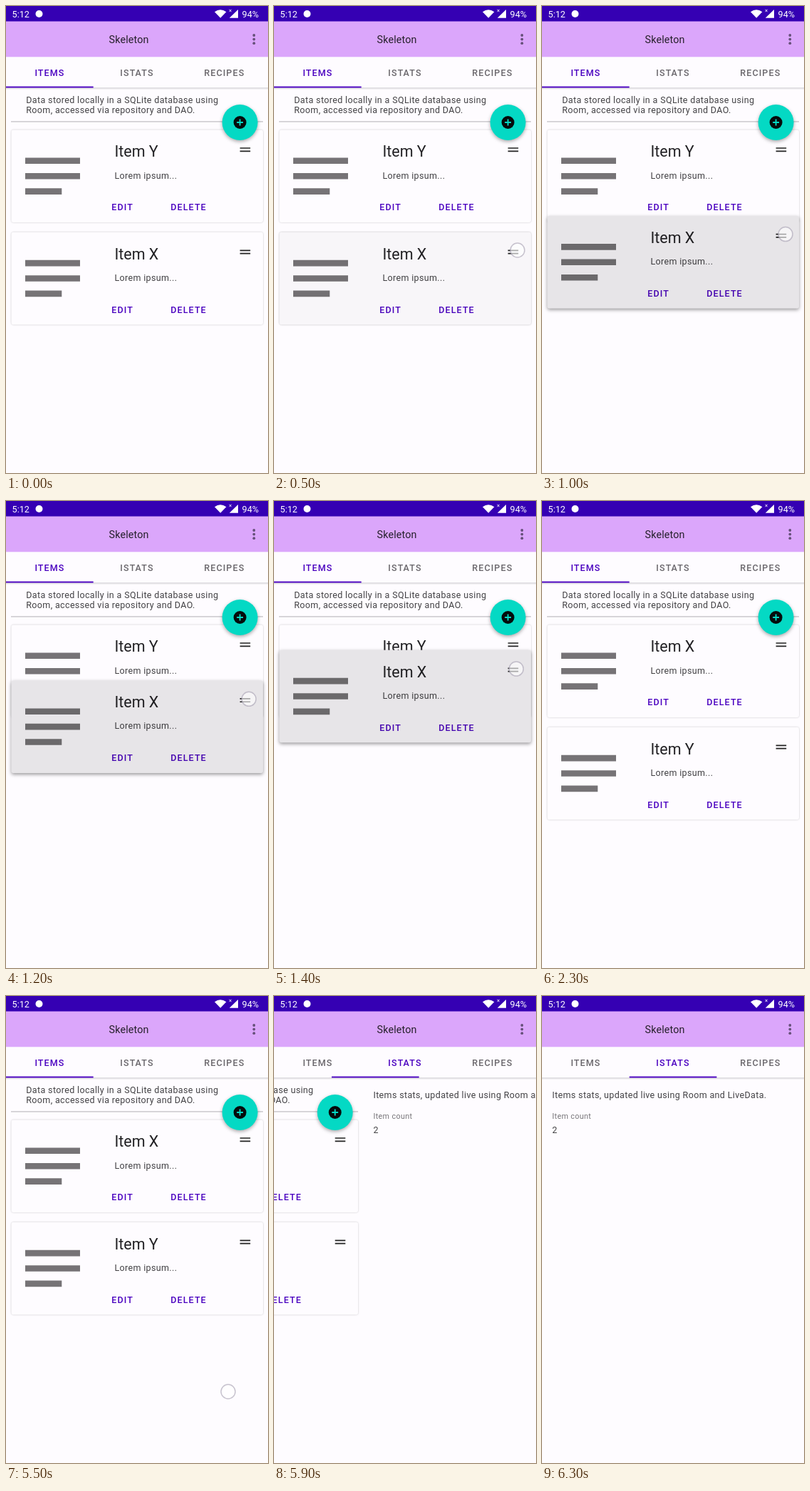
Animation, 368 px wide and 654 px high, one loop 8 s. Source, as an HTML page:

```html
<!DOCTYPE html>
<html lang="en">
<head>
<meta charset="utf-8">
<title>Skeleton</title>
<style>
html, body { margin: 0; width: 100%; height: 100%; overflow: hidden; background: #fefcff; }
svg { display: block; width: 368px; height: 654px; font-family: Roboto, sans-serif; }
text { white-space: pre; }
.bar { font-size: 14.3px; letter-spacing: .14px; fill: #25202b; }
.status { font-size: 12.6px; fill: #fff; }
.button { font-size: 12.53px; font-weight: 500; letter-spacing: 1.12px; fill: #4a00c0; }
.head { font-size: 21.5px; fill: #222124; }
.body { font-size: 12.53px; letter-spacing: .35px; fill: #434245; }
.caption { font-size: 10.74px; letter-spacing: .36px; fill: #777579; }
</style>
</head>
<body>
<svg viewBox="0 0 368 654">
  <defs>
    <clipPath id="list"><rect y="166" width="368" height="488"/></clipPath>
    <linearGradient id="fade" x2="0" y2="1">
      <stop stop-color="#000" stop-opacity=".17"/><stop offset="1" stop-color="#000" stop-opacity="0"/>
    </linearGradient>
  </defs>
  <rect width="368" height="654" fill="#fefcff"/>

  <g id="items">
    <text class="body" x="28.3" y="135.5">Data stored locally in a SQLite database using</text>
    <text class="body" x="28.3" y="150">Room, accessed via repository and DAO.</text>
    <rect x="7" y="161" width="354" height="1.8" fill="#d3d1d5"/>
    <g id="cards" clip-path="url(#list)"></g>
    <g style="filter:drop-shadow(0 2px 2.5px #0005)"><circle cx="328.6" cy="163" r="25" fill="#04d9c4"/></g>
    <circle cx="328.6" cy="163" r="9" fill="#050b0b"/>
    <path d="M324.2 163h8.8M328.6 158.6v8.8" stroke="#04d9c4" stroke-width="1.9"/>
  </g>

  <g id="stats">
    <text class="body" x="14.3" y="142.5">Items stats, updated live using Room and LiveData.</text>
    <text class="caption" x="14.3" y="172">Item count</text>
    <text class="body" x="14.3" y="192.3">2</text>
  </g>

  <rect y="71" width="368" height="43.5" fill="#fefcff"/>
  <rect y="114.3" width="368" height="3" fill="url(#fade)"/>
  <g id="tabs">
    <text class="button" x="40.4" y="98">ITEMS</text>
    <text class="button" x="160.3" y="98">ISTATS</text>
    <text class="button" x="278.3" y="98">RECIPES</text>
  </g>
  <rect id="mark" y="112.6" width="122.7" height="1.9" fill="#4a00c0"/>

  <rect width="368" height="71.3" fill="#dba6fb"/>
  <rect width="368" height="21.5" fill="#3500b3"/>
  <text class="bar" x="144.6" y="52">Skeleton</text>
  <g fill="#66507a">
    <circle cx="348.3" cy="41" r="1.9"/><circle cx="348.3" cy="46.6" r="1.9"/><circle cx="348.3" cy="52.2" r="1.9"/>
  </g>
  <text class="status" x="8.6" y="16">5:12</text>
  <circle cx="46.5" cy="11" r="5" fill="#fff"/>
  <path d="M293 8.3Q301 2 309.4 8.3L301.2 16.8ZM326 5V16.8H313.8Z" fill="#fff"/>
  <path d="M313.6 4.8l3 3.4m0-3.4l-3 3.4" stroke="#fff" stroke-width=".9"/>
  <text class="status" x="331.6" y="16">94%</text>

  <circle id="touch" r="10" fill="#fff" fill-opacity=".62" stroke="#aaa4b5" stroke-opacity=".65" stroke-width="1.5"/>
</svg>
<script>
const $ = id => document.getElementById(id);
const TOP = 173.5, PITCH = 143.3, LOOP = 8000;

const card = name => `<g id="card${name}">
  <rect class="plate" x="7.5" width="353.5" height="129.5" rx="3" fill="#fefcff"/>
  <path d="M27 39h77v8.6H27ZM27 60.4h77V69H27ZM27 81.8h51.3v8.6H27Z" fill="#767376"/>
  <text class="head" x="152.4" y="37.8">Item ${name}</text>
  <text class="body" x="152.4" y="68">Lorem ipsum...</text>
  <text class="button" x="148.2" y="112.8">EDIT</text>
  <text class="button" x="231.2" y="112.8">DELETE</text>
  <path d="M328.6 25.5h14.6M328.6 29.8h14.6" stroke="#222" stroke-width="1.7"/>
  <rect class="shade" x="7.5" width="353.5" height="129.5" rx="3" opacity="0"/>
</g>`;
$('cards').innerHTML = card('Y') + card('X');

const clamp = v => Math.min(1, Math.max(0, v));
const ease = v => (1 - Math.cos(Math.PI * clamp(v))) / 2;

// Linear interpolation through [time, value] points.
function track(t, points) {
  let [t0, v0] = points[0];
  for (const [t1, v1] of points) {
    if (t < t1) return t1 === t0 ? v1 : v0 + (v1 - v0) * (t - t0) / (t1 - t0);
    [t0, v0] = [t1, v1];
  }
  return v0;
}

const dragY = [[900, 0], [1000, -22.7], [1400, -108], [1500, -127],
  [1600, -142], [1700, -152], [1800, -160], [1900, -160]];
const swipe = [[5500, 0], [5600, .08], [5700, .26], [5800, .46], [5900, .66],
  [6000, .83], [6100, .94], [6200, .99], [6300, 1]];

function place(name, y, lift) {
  const g = $('card' + name);
  g.setAttribute('transform', `translate(0 ${y})`);
  g.querySelector('.plate').style.filter =
    `drop-shadow(0 ${.6 + 1.4 * lift}px ${.8 + 1.6 * lift}px rgba(0,0,0,${.22 + .18 * lift}))`;
  g.querySelector('.shade').setAttribute('opacity', .09 * lift);
}

function draw(t) {
  const settle = ease((t - 1900) / 350);
  const drag = track(t, dragY);
  const lift = clamp((t - 400) / 400) * (1 - settle);
  place('Y', TOP + PITCH * ease((t - 1650) / 250), 0);
  place('X', TOP + PITCH + drag + (-PITCH - drag) * settle, lift);

  const page = track(t, swipe);
  $('items').setAttribute('transform', `translate(${-368 * page} 0)`);
  $('stats').setAttribute('transform', `translate(${368 * (1 - page)} 0)`);
  $('mark').setAttribute('x', 122.7 * page);
  const active = t < 5900 ? 0 : 1;
  [...$('tabs').children].forEach((tab, i) => tab.style.fill = i === active ? '#4a00c0' : '#69666b');

  const dragging = t >= 500 && t < 1900, swiping = t >= 5500 && t < 5900;
  const x = swiping ? 312 - 368 * page : track(t, [[500, 342], [1000, 342], [1400, 340.3], [1800, 339]]);
  const y = swiping ? 554 : 342 + drag * .99;
  $('touch').setAttribute('transform', `translate(${x} ${y})`);
  $('touch').setAttribute('visibility', dragging || swiping ? 'visible' : 'hidden');
}

const start = performance.now();
function tick() {
  const t = (performance.now() - start) % LOOP;
  draw(Math.floor(t / 100) * 100);
  requestAnimationFrame(tick);
}
tick();
</script>
</body>
</html>
```
